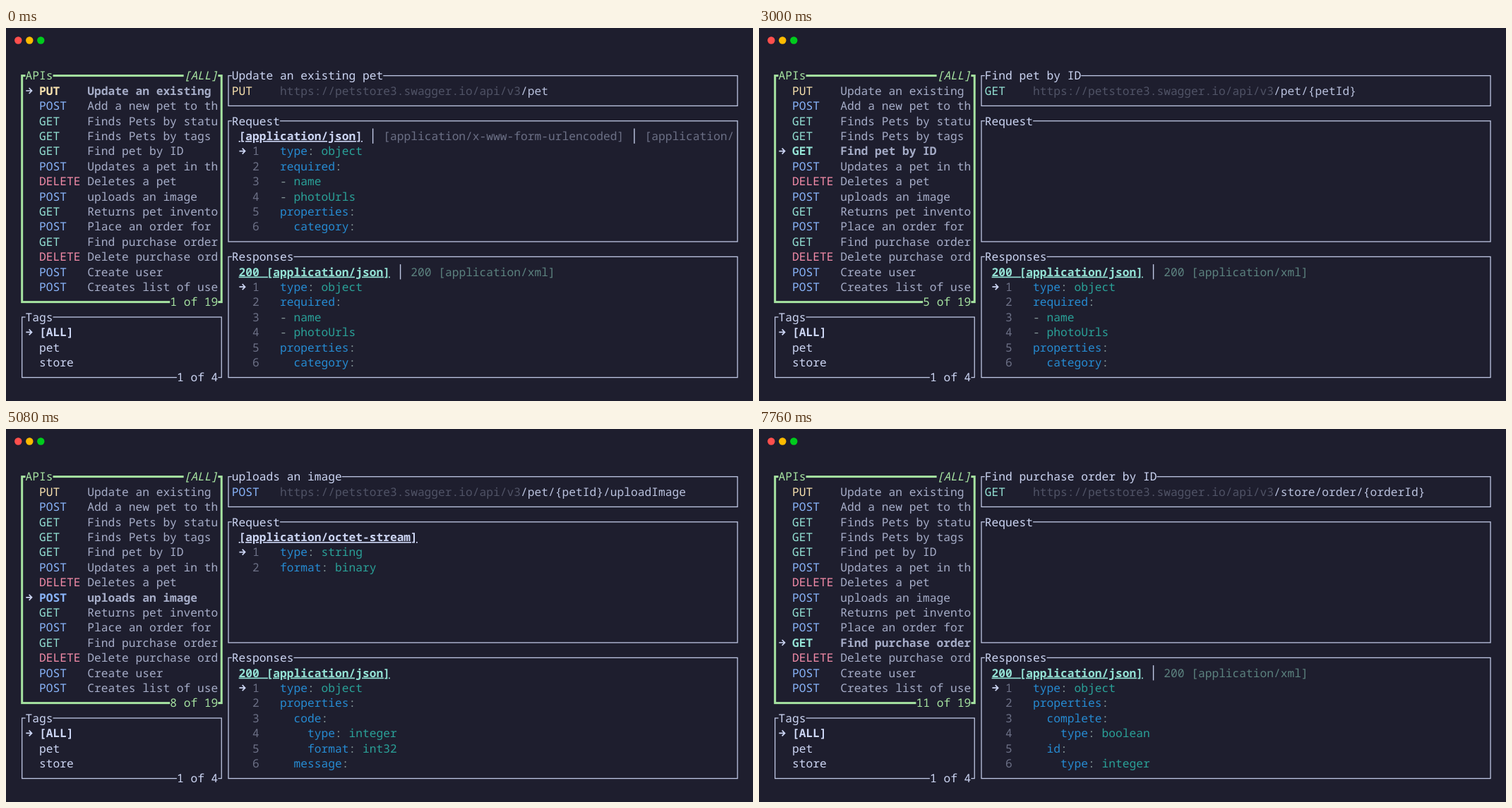
Animation, 1058 px wide and 529 px high, one loop 8000 ms. Source, as an HTML page:

```html
<!DOCTYPE html>
<html lang="en">
<head>
<meta charset="utf-8">
<title>API browser</title>
<style>
html, body { margin: 0; width: 100%; height: 100%; overflow: hidden; background: #1e1e2e; }
svg { display: block; width: 100vw; height: 100vh; }
text {
  font: 16.24px "Noto Sans Mono", "DejaVu Sans Mono", monospace;
  text-rendering: geometricPrecision;
  font-variant-ligatures: none;
}
.bold { font-weight: 700; }
.italic { font-style: italic; }
.active { font-weight: 700; text-decoration: underline; text-decoration-thickness: 1.4px; }
</style>
</head>
<body>
<svg id="stage" viewBox="0 0 1058 529"></svg>
<script>
const BG = '#1e1e2e', TEXT = '#cdd6f4', SUBTLE = '#a6adc8', BORDER = '#bfc7e4',
  MUTED = '#6c7086', FAINT = '#505366', GREEN = '#a6e3a1', TEAL = '#94e2d5',
  KEY = '#268bd2', VALUE = '#2aa198', PUNCT = '#839496';
const METHOD = { PUT: '#f9e2af', POST: '#89b4fa', GET: TEAL, DELETE: '#f38ba8' };
const BASE = 'https://petstore3.swagger.io/api/v3';
const LOOP = 8000;
const STARTS = [0, 1000, 1640, 2320, 3000, 3680, 4360, 5080, 5760, 6440, 7760];

const JSON_TAB = '[application/json]', OK_JSON = '200 ' + JSON_TAB;
const OK_TABS = [OK_JSON, '200 [application/xml]'];
const FORM_TABS = [JSON_TAB, '[application/x-www-form-urlencoded]', '[application/'];
const PET = ['type: object', 'required:', '- name', '- photoUrls', 'properties:', '  category:'];
const ORDER = ['type: object', 'properties:', '  complete:', '    type: boolean', '  id:', '    type: integer'];
const PETS = ['type: array', 'items:', "  $ref: '#/components/schemas/Pet'"];
const UPLOAD = ['type: string', 'format: binary'];
const RESULT = ['type: object', 'properties:', '  code:', '    type: integer', '    format: int32', '  message:'];
const STOCK = ['type: object', 'additionalProperties:', '  type: integer', '  format: int32'];

const form = lines => ({ tabs: FORM_TABS, lines });
const ok = (lines, tabs = OK_TABS) => ({ tabs, lines });
const none = { tabs: [], lines: [] };

// method, title, path, request, response
const APIS = [
  ['PUT', 'Update an existing pet', '/pet', form(PET), ok(PET)],
  ['POST', 'Add a new pet to the store', '/pet', form(PET), ok(PET)],
  ['GET', 'Finds Pets by status', '/pet/findByStatus', none, ok(PETS)],
  ['GET', 'Finds Pets by tags', '/pet/findByTags', none, ok(PETS)],
  ['GET', 'Find pet by ID', '/pet/{petId}', none, ok(PET)],
  ['POST', 'Updates a pet in the store with form data', '/pet/{petId}', none, none],
  ['DELETE', 'Deletes a pet', '/pet/{petId}', none, none],
  ['POST', 'uploads an image', '/pet/{petId}/uploadImage',
    { tabs: ['[application/octet-stream]'], lines: UPLOAD }, ok(RESULT, [OK_JSON])],
  ['GET', 'Returns pet inventories by status', '/store/inventory', none, ok(STOCK, [OK_JSON])],
  ['POST', 'Place an order for a pet', '/store/order', form(ORDER), ok(ORDER, [OK_JSON])],
  ['GET', 'Find purchase order by ID', '/store/order/{orderId}', none, ok(ORDER)],
  ['DELETE', 'Delete purchase order by ID'],
  ['POST', 'Create user'],
  ['POST', 'Creates list of users']
];

// Character grid: cell edges across, cell centres down
const CELL = 9.744;
const X = col => 17.8 + col * CELL;
const Y = row => 67.6 + row * 21.4;

const rect = (x, y, w, h, attrs) =>
  `<rect x="${x}" y="${y}" width="${w}" height="${h}" ${attrs}/>`;

const put = (col, row, str, color, cls = '') =>
  `<text x="${X(col)}" y="${Y(row) + 5.8}" fill="${color}" class="${cls}">${str}</text>`;

const arrow = (col, row) =>
  `<path d="M${X(col) + .8} ${Y(row)}h8m-3.7 -4l3.9 4l-3.9 4" fill="none" stroke="${TEXT}" stroke-width="1.7"/>`;

// Text that interrupts a border line
const label = (col, row, str, color, cls) =>
  rect(X(col), Y(row) - 4, str.length * CELL, 8, `fill="${BG}"`) + put(col, row, str, color, cls);

function panel(left, top, right, bottom, title, color = TEXT, stroke = BORDER, width = 1.3) {
  const x = X(left + .5), y = Y(top);
  return rect(x, y, X(right + .5) - x, Y(bottom) - y,
    `fill="none" stroke="${stroke}" stroke-width="${width}"`) + label(left + 1, top, title, color);
}

function yaml(line, row) {
  let out = '';
  for (const m of line.matchAll(/([$\w]+)(?=:)|([:-])(?= |$)|[^\s:]+/g))
    out += put(38 + m.index, row, m[0], m[1] ? KEY : m[2] ? PUNCT : VALUE);
  return out;
}

function schema({ tabs, lines }, row, color, dim) {
  let out = '', col = 32;
  tabs.forEach((tab, i) => {
    if (i) {
      out += rect(X(col + 1.5) - .7, Y(row) - 10.7, 1.4, 21.4, `fill="${BORDER}"`);
      col += 3;
    }
    out += put(col, row, tab, i ? dim : color, i ? '' : 'active');
    col += tab.length;
  });
  if (lines.length) out += arrow(32, row + 1);
  lines.forEach((line, i) => {
    out += put(34, row + 1 + i, i + 1, MUTED) + yaml(line, row + 1 + i);
  });
  return out;
}

function apiList(selected) {
  const count = `${selected + 1} of 19`;
  return panel(0, 0, 29, 15, 'APIs', GREEN, GREEN, 3) +
    label(24, 0, '[ALL]', GREEN, 'italic') +
    label(29 - count.length, 15, count, GREEN) +
    APIS.map(([method, title], i) => {
      const cls = i === selected ? 'bold' : '';
      return put(3, i + 1, method, METHOD[method], cls) +
        put(10, i + 1, title.slice(0, 19), SUBTLE, cls);
    }).join('') + arrow(1, selected + 1);
}

function tagList() {
  return panel(0, 16, 29, 20, 'Tags') + label(23, 20, '1 of 4', TEXT) + arrow(1, 17) +
    put(3, 17, '[ALL]', TEXT, 'bold') + put(3, 18, 'pet', TEXT) + put(3, 19, 'store', TEXT);
}

function details([method, title, path, request, response]) {
  return panel(30, 0, 104, 2, title) +
    put(31, 1, method, METHOD[method]) +
    put(38, 1, BASE, FAINT) + put(38 + BASE.length, 1, path, '#bac2de') +
    panel(30, 3, 104, 11, 'Request') + schema(request, 4, TEXT, MUTED) +
    panel(30, 12, 104, 20, 'Responses') + schema(response, 13, TEAL, '#5c827f');
}

const dots = ['#ff4f4d', '#febb00', '#00cc1d'].map((color, i) =>
  `<circle cx="${17.3 + i * 16}" cy="17.5" r="5.2" fill="${color}"/>`).join('');

const stage = document.getElementById('stage');
let shown = -1;

function frame() {
  const time = performance.now() % LOOP;
  const selected = STARTS.filter(start => start <= time).length - 1;
  if (selected !== shown) {
    shown = selected;
    stage.innerHTML = dots + apiList(selected) + tagList() + details(APIS[selected]);
  }
  requestAnimationFrame(frame);
}
frame();
</script>
</body>
</html>
```
